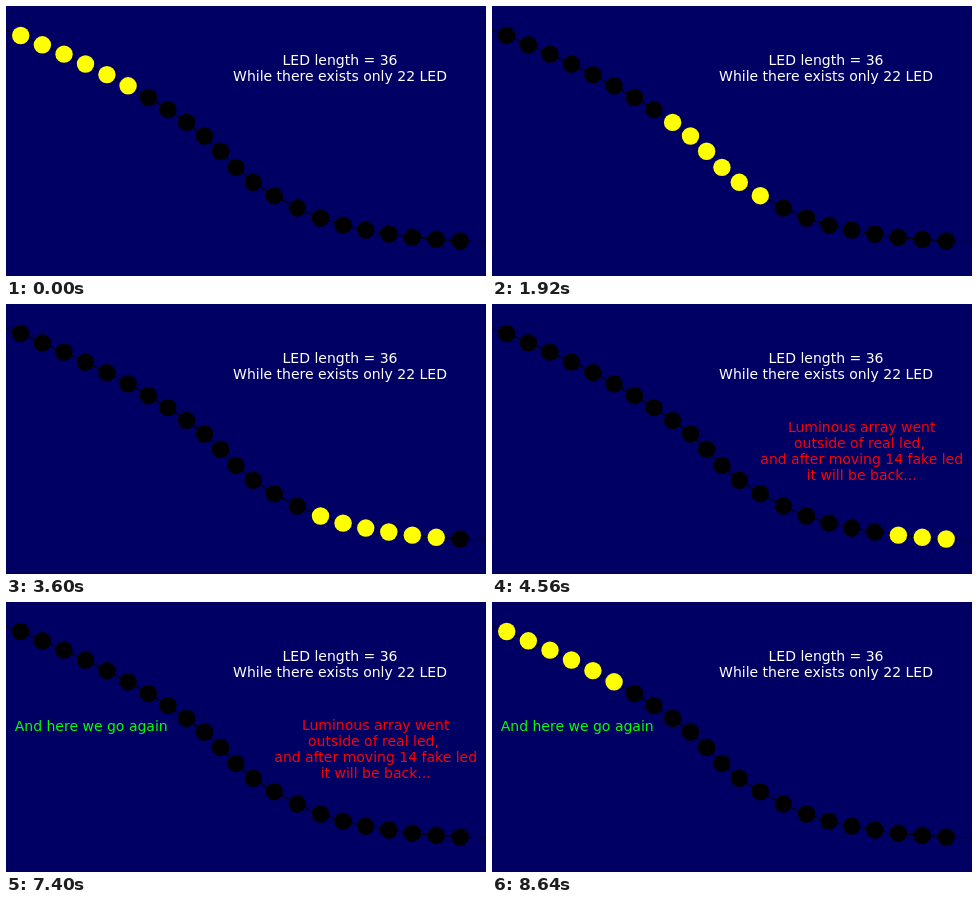
Recreate the animation shown at these times as an HTML page. Size 480 by 270 pixels, loop 8.68 s.

```html
<!DOCTYPE html>
<html lang="en">
<head>
<meta charset="utf-8">
<title>LED strip</title>
<style>
  html, body { margin: 0; width: 100%; height: 100%; overflow: hidden; background: #000064; }
  svg { display: block; width: 100%; height: 100%; }
  text { font: 14px "DejaVu Sans", Verdana, sans-serif; text-anchor: middle; white-space: pre; }
</style>
</head>
<body>
<svg id="stage" viewBox="0 0 480 270"></svg>
<script>
const LOOP = 8680, STEP = 240;
const STRIP_LENGTH = 36, LED_COUNT = 22, LIT_COUNT = 6, LEDS_PER_KEY = 3;
// The wire's bends: one key every three LEDs, plus one beyond each end.
const keys = [
  [-50, 1], [14.7, 29.5], [79.5, 58], [142.5, 91.5], [198.5, 130],
  [247.3, 176.3], [314.5, 212], [382.8, 228], [454.2, 235], [526, 238]
];
const stage = document.getElementById("stage");

function catmullRom(a, b, c, d, t) {
  return b + t / 2 * (c - a + t * (2 * a - 5 * b + 4 * c - d + t * (3 * (b - c) + d - a)));
}

function ledPosition(index) {
  const segment = Math.min(Math.floor(index / LEDS_PER_KEY), keys.length - 4);
  const t = index / LEDS_PER_KEY - segment;
  const [a, b, c, d] = keys.slice(segment, segment + 4);
  return [0, 1].map(axis => catmullRom(a[axis], b[axis], c[axis], d[axis], t));
}

function add(parent, tag, attributes, content = "") {
  const node = document.createElementNS("http://www.w3.org/2000/svg", tag);
  for (const key in attributes) node.setAttribute(key, attributes[key]);
  node.textContent = content;
  return parent.appendChild(node);
}

function addCaption(x, y, fill, lines) {
  const group = add(stage, "g", { fill });
  lines.forEach((line, i) => add(group, "text", { x, y: y + 16 * i }, line));
  return group;
}

const points = Array.from({ length: LED_COUNT }, (_, i) => ledPosition(i));
add(stage, "polyline", {
  points: [[0, 24], ...points, [480, 236]].join(" "),
  fill: "none", stroke: "#000", "stroke-width": 1.1
});
const leds = points.map(([cx, cy]) => add(stage, "circle", { cx, cy, r: 8.7 }));

addCaption(334, 59, "#fff", ["LED length = 36", "While there exists only 22 LED"]);
const outside = addCaption(369.7, 128, "#f00", [
  "Luminous array went", "outside of real led, ",
  "and after moving 14 fake led", "it will be back..."
]);
const again = addCaption(85.2, 129, "#0f0", ["And here we go again"]);

function show(node, visible) {
  node.setAttribute("visibility", visible ? "visible" : "hidden");
}

function draw() {
  const time = performance.now() % LOOP;
  const step = Math.floor(time / STEP);
  leds.forEach((led, i) => {
    const offset = (i - step + STRIP_LENGTH) % STRIP_LENGTH;
    led.setAttribute("fill", offset < LIT_COUNT ? "#ff0" : "#000");
  });
  show(outside, time >= 4040 && time < 8040);
  show(again, time >= 7400);
  requestAnimationFrame(draw);
}
draw();
</script>
</body>
</html>
```
